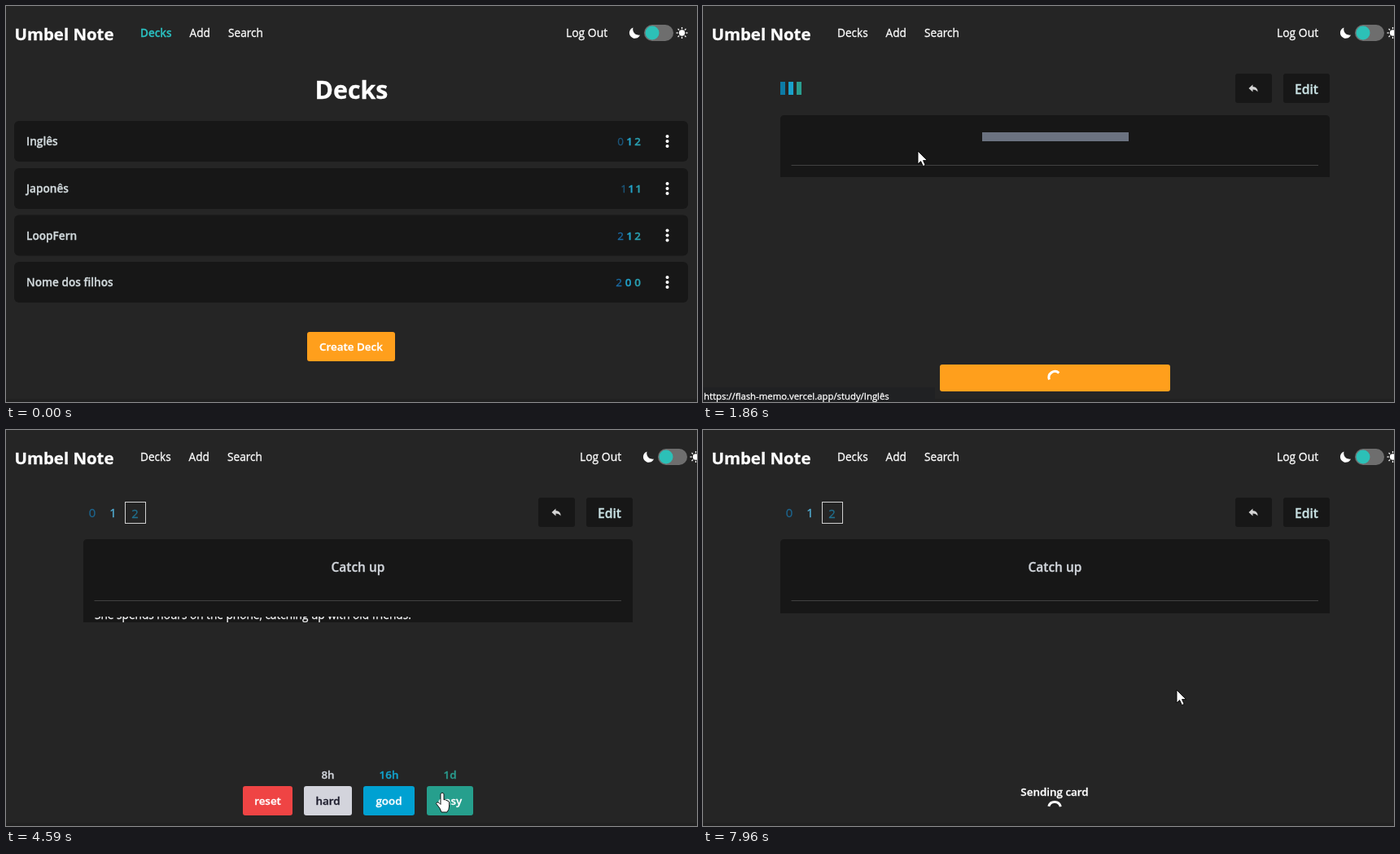
Animation of 849 by 486 pixels, one loop 8 s. Source, as an HTML page:

```html
<!DOCTYPE html>
<html lang="pt">
<head>
<meta charset="utf-8">
<title>Umbel Note</title>
<style>
html, body { margin: 0; width: 100%; height: 100%; overflow: hidden; background: #252525; }
svg { display: block; width: 849px; height: 486px; font-family: "Open Sans", "Noto Sans", sans-serif; }
text { stroke-width: .3px; }
</style>
</head>
<body>
<svg id="stage" viewBox="0 0 849 486"></svg>
<script>
const LOOP = 8000;
const OPEN_STUDY = 1720, LOADED = 2840, SHOW_ANSWER = 4590, SEND = 6620;
const DARK = '#171717', ORANGE = '#ff9f1c', PALE = '#d1d5db', BLUE = '#1b6ca6', SKY = '#22a3cb', TEAL = '#2a9fb0';
const BODY = 13.65;

const ROWS = [
  { name: 'Inglês', y: 141, counts: [0, 1, 2], at: [755, 766, 776] },
  { name: 'Japonês', y: 199, counts: [1, 1, 1], at: [759, 768, 777] },
  { name: 'LoopFern', y: 256.5, counts: [2, 1, 2], at: [755, 766, 776] },
  { name: 'Nome dos filhos', y: 314, counts: [2, 0, 0], at: [753, 764.5, 776] },
];

const GRADES = [
  { name: 'reset', x: 291, w: 61, fill: '#ef4444' },
  { name: 'hard', x: 366, w: 59, fill: '#d3d4dc', ink: '#1c1c2c', wait: '8h', tint: PALE },
  { name: 'good', x: 439, w: 63, fill: '#00a1d2', wait: '16h', tint: '#12a3cf' },
  { name: 'easy', x: 517, w: 57, fill: '#269f8d', wait: '1d', tint: '#2a9d8f' },
];

// Pointer path: time, x, y
const PATH = [
  [410, 762, 480], [620, 640, 408], [830, 440, 298], [970, 320, 224], [1040, 288, 206],
  [1180, 268, 147], [1250, 268, 147], [1520, 264, 178], [2300, 264, 178], [2800, 440, 270],
  [3320, 616, 370], [3530, 601, 393], [4160, 545, 441], [4300, 530, 437], [4440, 536, 445],
  [4800, 536, 445], [5360, 473, 440], [5500, 474, 454], [6900, 474, 454], [7400, 555, 395],
  [7900, 582, 319],
];

const rect = (x, y, w, h, fill, r = 0) =>
  `<rect x="${x}" y="${y}" width="${w}" height="${h}" fill="${fill}" rx="${r}"/>`;
const circle = (x, y, r, fill) => `<circle cx="${x}" cy="${y}" r="${r}" fill="${fill}"/>`;
const label = (str, x, y, fill = '#fff', size = BODY, weight = 400, anchor = 'start') =>
  `<text x="${x}" y="${y}" fill="${fill}" stroke="${fill}" font-size="${size}" font-weight="${weight}" text-anchor="${anchor}">${str}</text>`;
const centered = (str, x, y, fill, size, weight = 600) => label(str, x, y, fill, size, weight, 'middle');
const button = (str, x, y, w, fill, ink = '#fff') =>
  rect(x, y, w, 36, fill, 3) + centered(str, x + w / 2, y + 23, ink, 13.4);

function ease(p) {
  p = Math.min(1, Math.max(0, p));
  return p * p * (3 - 2 * p);
}

function pointerAt(t) {
  const i = PATH.findIndex(k => k[0] > t);
  if (i === 0) return null;
  if (i < 0) return PATH.at(-1).slice(1);
  const [a, b] = [PATH[i - 1], PATH[i]];
  const p = (t - a[0]) / (b[0] - a[0]);
  return [a[1] + (b[1] - a[1]) * p, a[2] + (b[2] - a[2]) * p];
}

function pointer([x, y], hand) {
  const d = hand
    ? 'M-2 1.5q2-3 4 0v7.5q1.8-1.5 2.5.5 1.8-.8 2.2 1 1.400-.5 1.800 1.500v5q0 3.500-2.500 7h-7q-1-4.500-6.500-10.500 1-3 3.500-1l2 2z'
    : 'M0 0V16l3.600-3.400 2.800 6 2.800-1.200-2.700-5.800h5z';
  return `<path d="${d}" transform="translate(${x} ${y})" fill="#fff" stroke="#000" stroke-width=".9"/>`;
}

function spinner(x, y, t) {
  const start = 160 + (t - 1860) * .36;
  return `<path d="M7.500 0A7.500 7.500 0 0 1 -6.500 3.750" transform="translate(${x} ${y}) rotate(${start})"
    fill="none" stroke="#fff" stroke-width="3"/>`;
}

function header(study) {
  const shift = study ? 17 : 0;
  let rays = '';
  for (let a = 0; a < 360; a += 45) rays += `<path d="M0-4.800V-7" transform="rotate(${a})"/>`;
  return label('Umbel Note', 10.5, 42, '#fff', 20.4, 700) +
    label('Decks', 165, 38, study ? '#fff' : '#2bbfc0', study ? BODY : 13.5, study ? 400 : 600) +
    label('Add', study ? 224.5 : 225.5, 38) + label('Search', study ? 272 : 273, 38) +
    `<g transform="translate(${shift})">` + label('Log Out', 688, 38, '#fff', 13.9) +
    '<path d="M770.500 26.500a6.800 6.800 0 1 0 8.500 9A7.200 7.200 0 0 1 770.500 26.500z" fill="#fff"/>' +
    rect(784, 23, 36, 20, '#6e6e6e', 10) + circle(794, 33, 8.5, '#2cc0b7') +
    `<g transform="translate(830.500 33)" stroke="#fff" stroke-width="1.300">${circle(0, 0, 3, '#fff')}${rays}</g></g>`;
}

function deckList(hover) {
  let out = centered('Decks', 424.5, 114, '#fff', 30.3, 700);
  ROWS.forEach((row, i) => {
    const { name, y, counts, at } = row, base = y + 30;
    out += rect(10, y, 828, 50, DARK, 6);
    if (i === hover) out += `<path d="M741 ${y}H16q-6 0-6 6v38q0 6 6 6H741z" fill="#080808"/>`;
    out += label(name, 25, base, '#d2dadd', BODY, 600);
    counts.forEach((n, k) => {
      const ink = k ? (k === 1 ? SKY : TEAL) : n === 2 ? BLUE : '#1d577c';
      out += centered(n, at[k], base, ink, 13.4, k ? 600 : 400);
    });
    for (const dy of [19, 25, 31]) out += circle(812.5, y + dy, 2, '#fff');
  });
  return out + button('Create Deck', 370, 400, 108, ORANGE);
}

// The text slides down while its box unfolds
function answer(height) {
  if (height <= 0) return '';
  const lines = [
    'Colocar a conversa em dia, alcançar alguém.',
    'She spends hours on the phone, catching up with old friends.',
    'He stopped and waited for Ilse to catch up.',
  ];
  const slide = (height - 136) * .53;
  return `<clipPath id="fold">${rect(95, 229, 675, Math.max(0, height - 4), '#fff')}</clipPath><g clip-path="url(#fold)">` +
    lines.map((s, i) => label(s, 109, 255 + 43 * i + slide, '#f4f5f6')).join('') + '</g>';
}

function studyCard(t) {
  const loaded = t >= LOADED;
  const fold = t < SHOW_ANSWER ? 0
    : t < SEND ? 136 * ease((t - 4530) / 350)
    : 136 * (1 - ease((t - 6580) / 250));
  const bottom = loaded ? 225 + fold : 210;
  let out = rect(654, 83, 45, 36, DARK, 3) +
    '<path d="M670.500 101l5-4.500v2.500q6 0 6 6.500-2-3-6-3v3z" fill="#d4d4d4"/>' +
    rect(713, 83, 57, 36, DARK, 3) + centered('Edit', 741.5, 108, '#c9e2e4', 15.6) +
    `<path d="M95 ${bottom}V139q0-5 5-5H765q5 0 5 5V${bottom}z" fill="${DARK}"/>` +
    rect(108.5, loaded ? 209 : 195, 647.5, 1, '#414141');

  if (!loaded) {
    ['#0d7aa5', '#1aa2cc', '#2a9d8f'].forEach((c, i) => out += rect(95 + 10 * i, 93, 6, 16, c));
    return out + rect(343, 155, 180, 11, '#6b7280') +
      rect(291, 440, 283, 33, ORANGE, 3) + spinner(432.5, 456, t);
  }

  out += centered(0, 106, 107, '#1d6690', 14.8, 400) + centered(1, 131.5, 107, '#55b8e2', 14.8, 400) +
    centered(2, 158.5, 108, '#20708f', 14.8, 400) +
    '<rect x="146.500" y="88.500" width="25" height="26" fill="none" stroke="#d0d0d0"/>' +
    centered('Catch up', 432.5, 174, PALE, 15.5) + answer(fold);

  if (t < SHOW_ANSWER) return out + button('Show Answer', 291, 437, 283, ORANGE);
  if (t >= SEND) return out + centered('Sending card', 432, 449, '#fff', 13.4) + spinner(432, 464, t);
  for (const g of GRADES) {
    out += button(g.name, g.x, 437, g.w, g.fill, g.ink);
    if (g.wait) out += centered(g.wait, g.x + g.w / 2, 428, g.tint, 13.4);
  }
  return out;
}

function overButton([x, y], t) {
  if (y < 437 || y > 473 || t >= SEND) return false;
  if (t < SHOW_ANSWER) return x >= 291 && x <= 574;
  return GRADES.some(g => x >= g.x && x <= g.x + g.w);
}

function scene(t) {
  const study = t >= OPEN_STUDY, pos = pointerAt(t);
  const hover = pos && !study && pos[0] < 741
    ? ROWS.findIndex(r => pos[1] >= r.y && pos[1] <= r.y + 50) : -1;
  let out = rect(0, 0, 849, 486, '#252525') + rect(0, 482, 849, 4, '#212121') +
    header(study) + (study ? studyCard(t) : deckList(hover));
  if (t >= 1250 && t < 2300) {
    out += rect(0, 468, 285, 18, '#202123') +
      label('https://flash-memo.vercel.app/study/Inglês', 1, 483, '#fff', 11.35);
  }
  if (pos) out += pointer(pos, study ? overButton(pos, t) : hover >= 0);
  return out;
}

const stage = document.getElementById('stage');
const began = performance.now();
function draw() {
  stage.innerHTML = scene((performance.now() - began) % LOOP);
  requestAnimationFrame(draw);
}
draw();
</script>
</body>
</html>
```
